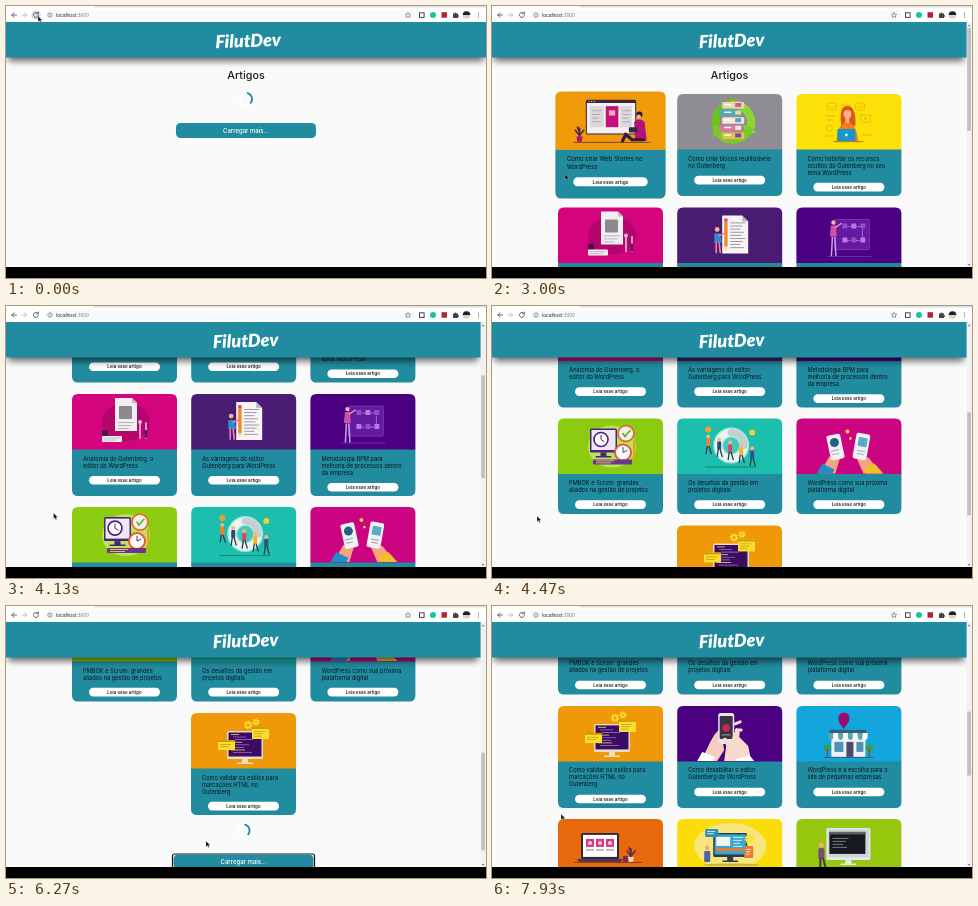
Animation, 480 px wide and 272 px high, one loop 8 s. Source, as an HTML page:

```html
<!DOCTYPE html>
<html lang="pt">
<head>
<meta charset="utf-8">
<title>Artigos</title>
<style>
html, body { margin: 0; width: 100%; height: 100%; overflow: hidden; background: #fafafa; }
svg { display: block; width: 480px; height: 272px; }
text { font-family: Inter, "Open Sans", sans-serif; }
.title { font-size: 5.7px; fill: #08161b; }
.read { font-size: 4.5px; font-weight: 600; fill: #222; text-anchor: middle; }
.url { font: 5px Roboto, sans-serif; fill: #333; }
.mid { text-anchor: middle; }
</style>
</head>
<body>
<svg id="stage" viewBox="0 0 480 272"></svg>
<script>
const LOOP = 8000, LOADED = 1130, CLICK = 5900, MORE = 7130;
const TEAL = '#218c9f', ROWS = [88, 201.5, 314.5, 421.5, 534.5];

// Shape helpers
const R = (x, y, w, h, fill, rx = 0, more = '') =>
  `<rect x="${x}" y="${y}" width="${w}" height="${h}" fill="${fill}" rx="${rx}" ${more}/>`;
const C = (x, y, r, fill, more = '') => `<circle cx="${x}" cy="${y}" r="${r}" fill="${fill}" ${more}/>`;
const E = (x, y, rx, ry, fill) => `<ellipse cx="${x}" cy="${y}" rx="${rx}" ry="${ry}" fill="${fill}"/>`;
const P = (d, fill) => `<path d="${d}" fill="${fill}"/>`;
const L = (d, color, w = 1, more = '') =>
  `<path d="${d}" fill="none" stroke="${color}" stroke-width="${w}" stroke-linecap="round" ${more}/>`;
const many = (n, f) => Array.from({ length: n }, (_, i) => f(i)).join('');
const lines = (n, x, y, w, gap, color, h = .8) =>
  many(n, i => R(x, y + i * gap, w * (1 - (i * 7 % 5) / 12), h, color));
const plant = (x, y, leaf, pot) =>
  L(`M${x} ${y - 4}v-9M${x} ${y - 6}l-4 -5M${x} ${y - 6}l4 -5M${x} ${y - 9}l-2 -5`, leaf, 1.6) +
  P(`M${x - 3} ${y - 5}h6l-1 5h-4z`, pot);
const monitor = (x, y, w, h, frame, screen) =>
  R(x, y, w, h, frame, 1.5) + R(x + 1.5, y + 1.5, w - 3, h - 4, screen) +
  R(x + w / 2 - 3, y + h, 6, 4, frame) + R(x + w / 2 - 8, y + h + 3.5, 16, 1.5, frame, .7);

const webStories = () =>
  plant(23, 48, '#4a2a45', '#b3106f') + L('M18 48.5H90', '#4b2744', .7) +
  R(29, 8, 48, 33, '#43263f', 1.5) + R(30, 11, 46, 29, '#f3eff0') +
  many(3, i => C(32 + i * 2.5, 9.5, .6, '#f4c44d')) +
  R(33, 14, 13, 20, '#ddd6da') + R(48, 14, 12, 20, '#c4107a') + R(62, 14, 11, 20, '#ddd6da') +
  R(51, 18, 6, 5, '#f0a9c2') + lines(4, 35, 18, 9, 3.5, '#aaa0a8') + lines(4, 64, 18, 8, 3.5, '#aaa0a8') +
  C(80, 22, 3, '#3a1730') + C(79.5, 24, 2, '#f1b097') +
  P('M75 29q5 -5 10 0l2 18h-11z', '#b3127a') + L('M84 46L73 46L67 41L64 47', '#31194a', 3) +
  R(70, 34, 8, 5, '#37283b', .6);

const ARROWS = ['#6cc21c', '#8ed62f', '#79cb25'];
const blocks = () =>
  many(3, i => `<g transform="rotate(${i * 120} 56 28)">` +
    L('M41 37A18 18 0 0 1 54 10', ARROWS[i], 8, 'stroke-linecap="butt"') + P('M53 3l10 7l-10 8z', ARROWS[i]) + '</g>') +
  many(5, i => R(45 - i % 2 * 3, 8 + i * 7.6, 22, 6.6, ['#f0d3b7', '#53a9bd', '#f6e7da', '#d77aa0', '#e8bd57'][i], 1) +
    R(47, 10 + i * 7.6, 7, 1.4, '#fff') + R(58, 9 + i * 7.6, 6, 4, ['#cc5d8b', '#f3d887', '#5c9fc0', '#f1efe9', '#7a4d9b'][i]));

const resources = () =>
  many(3, i => R(31 + i * 14, 9 + i % 2 * 2, 9, 7, 'none', 1, 'stroke="#eda80c" stroke-width=".7"') +
    L(`M${33 + i * 14} 13h5`, '#eda80c', .7)) +
  R(64, 21, 10, 7, 'none', .6, 'stroke="#eda80c" stroke-width=".7"') + P('M68 22.8v3.4l3 -1.7z', '#eda80c') +
  L('M30 22h8M31 26h6M28 42h8M67 41h9', '#eda80c', .8) + C(33, 34, 3, 'none', 'stroke="#eda80c" stroke-width=".7"') +
  P('M45 32q-3 -20 6 -20t8 20z', '#d9571a') + C(51, 20, 4, '#f8b08a') +
  P('M40 48q1 -19 11 -20q9 1 11 20z', '#f47b20') + R(49, 23, 4, 6, '#f8b08a') +
  R(41, 35, 18, 12, '#1697c9', 1) + C(50, 41, 1.4, '#d7f1f8') + R(37, 47, 30, 1.2, '#c9790e');

const anatomy = () =>
  E(54, 28, 24, 19, '#b3056c') + P('M43 4h17l5 5v28h-22z', '#f3eff1') + P('M60 4v5h5z', '#c5b8c0') +
  R(47, 12, 13, 13, '#8d8790', 1) + lines(3, 46, 28, 16, 3, '#a9a3aa') +
  L('M68 29v15M74 29v15', '#e2c4d6', 1.6) + C(68, 28, 2, '#e2c4d6') + R(72.8, 36, 2.4, 8, '#5f1548', 1) +
  R(30, 36, 6, 6, '#4a1240', 1) + R(30, 42, 20, 6, '#f4eef2', 1) + lines(2, 32, 43.5, 16, 2, '#b9aeb6');

const editor = () =>
  P('M45 8h20l6 6v32h-26z', '#f6f4f5') + P('M65 8v6h6z', '#bdb5c3') +
  lines(9, 53, 15, 15, 3.1, '#8b8393') + R(47, 14, 3.4, 25, '#ef8b26') + P('M47 39h3.4l-1.7 5z', '#f5d1a3') +
  R(47, 11, 3.4, 3, '#db437f') + C(40, 22, 2.4, '#f4ae92') + P('M37 26h6l2 9h-8z', '#3187ca') +
  L('M39 35v10M42 35l1 10M42 28l5 -2', '#e87ea5', 1.7);

const process = () =>
  R(38, 12, 35, 30, '#6419a0', 1, 'stroke="#8a45c4" stroke-width=".7"') +
  many(6, i => R(46 + i % 3 * 9, 16 + (i / 3 | 0) * 14, 5, 5, i % 2 ? '#b67ae0' : '#8f4fca', .5)) +
  L('M52 19h3M61 19h3M66 22v8M60 33h3M51 33h3', '#c79aea', .6) +
  C(37, 15, 2.2, '#f6b2a0') + P('M34.500 18h5l1 11h-7z', '#d24fa8') +
  L('M36 30l-1 18M38.500 30l1 18', '#c9a3e6', 1.5) + L('M39 20l6 -4', '#f6b2a0', 1.2) + R(31, 48.5, 44, .8, '#7a35b5');

const scrum = () =>
  E(54, 28, 24, 21, '#b8e35a') + monitor(32, 10, 27, 24, '#4c2376', '#eee7f6') +
  C(43, 21, 7, '#fff', 'stroke="#4c2376" stroke-width="1.6"') + L('M43 17v4l3 2', '#4c2376') +
  C(68, 15, 8, '#f2f0e8', 'stroke="#de742b" stroke-width="1.8"') + L('M65 15l2 3l5 -6', '#57a832', 1.5) +
  C(65, 34, 8, '#fff', 'stroke="#e65b39" stroke-width="2"') + L('M65 29v5l4 -2', '#513070') +
  R(35, 41, 39, 5, '#6b368d', 1) + lines(2, 38, 42, 18, 2, '#f5d763') + L('M76 23v17', '#ed9c25', 2);

const challenges = () =>
  C(54, 27, 18, '#9fe7dc') + C(54, 27, 13, 'none', 'stroke="#eef3ee" stroke-width="7"') +
  L('M54 14a13 13 0 0 1 13 13', '#c4cfd1', 7) + C(54, 27, 8, '#3ec9ba') +
  many(5, i => { const x = 31 + i * 11, y = 18 + i * 17 % 14;
    return C(x, y, 2, '#f4b48c') + R(x - 2, y + 2, 4, 8, ['#ef8227', '#274e7a', '#d94665', '#f2b625', '#31508b'][i], 1) +
      L(`M${x - 1} ${y + 10}l-1 7M${x + 1} ${y + 10}l2 7`, '#253851', 1.3); }) +
  C(31, 11, 3, '#ef9f2b') + C(75, 14, 3, '#f0d035') + R(28, 48, 51, 1, '#118174');

const phones = () =>
  P('M23 55l10 -17h11l-5 17z', '#f5a47f') + P('M20 55l6 -10l12 6l-2 4z', '#208dc7') +
  R(32, 16, 14, 25, '#eef0f4', 2, 'transform="rotate(-12 39 28)"') + C(38, 24, 4.5, '#28617f') +
  L('M35 33l7 -2M36 36l6 -1', '#9db2bf', 1.2) +
  P('M60 39h12l13 16h-18z', '#f5a47f') + P('M67 50l11 -5l9 10h-17z', '#f3bd29') +
  R(58, 15, 14, 26, '#f1f0f3', 2, 'transform="rotate(10 65 28)"') + R(61, 19, 9, 9, '#5baac9', 1, 'transform="rotate(10 65 28)"') +
  L('M61 32l7 1M61 35l6 1', '#a8abb8', 1.2) + C(51, 13, 2, '#f4c83a') + C(54, 20, 1.4, '#f4c83a');

const gear = (x, y, r) => C(x, y, r, 'none', 'stroke="#f8e12d" stroke-width="1.6"') +
  C(x, y, r + 1.3, 'none', 'stroke="#f8e12d" stroke-width="1.2" stroke-dasharray="1.4 1.4"');
const markup = () =>
  monitor(36, 18, 36, 28, '#e9dcc9', '#3a0d63') +
  many(8, i => R(40 + i % 3 * 2, 21 + i * 2.6, 8 + i * 5 % 12, .8, ['#f2d44d', '#a55fc0', '#8b7fd8'][i % 3])) +
  R(61, 14, 17, 12, '#f7df2c', .7) + R(61, 14, 17, 2, '#cf9b0c') + lines(3, 63, 18, 11, 2.4, '#c89b12') +
  R(27, 27, 17, 10, '#f7df2c', .7) + R(27, 27, 17, 2, '#cf9b0c') + lines(2, 29, 31, 11, 2.4, '#c89b12') +
  gear(57, 12, 2.4) + gear(65, 9, 1.8);

const hands = () =>
  P('M24 55l9 -19q4 -8 10 -14l4 22l-7 11z', '#f3cdbd') + P('M20 55l5 -9l13 5l-2 4z', '#fff') +
  R(41, 7, 16, 31, '#e9e4ea', 2.5) + R(42.5, 10, 13, 23, '#3a3342', 1) + C(49, 22, 3.8, '#c82658') +
  L('M45 29h8', '#a79fae') + C(49, 35.5, 1, '#888') +
  P('M47 55l2 -15l-3 -8q4 -1 7 5l6 -15q5 1 3 9l9 9l3 15z', '#f7dacb') + P('M59 53l13 -4l5 6h-18z', '#fff') +
  L('M58 18l5 -2M59 24l5 0', '#f7dacb', 3);

const shop = () =>
  R(35, 29, 34, 22, '#eef0f2') + R(33, 24, 37, 4, '#35607f') +
  many(8, i => P(`M${32 + i * 4.9} 27h4.9v5q-2.45 4 -4.9 0z`, i % 2 ? '#fff' : '#5aa9a6')) +
  R(38, 36, 9, 10, '#4c93b5') + R(50, 36, 7, 15, '#4b4a6b') + R(60, 36, 7, 10, '#4c93b5') +
  P('M47 23q-6 -8 -5 -11a5.5 5.5 0 0 1 11 0q1 3 -6 11z', '#9a0c72') +
  C(31, 42, 3.6, '#3f9a5a') + R(30.4, 43, 1.2, 8, '#71502c') + C(73, 42, 3.8, '#3f9a5a') + R(72.4, 43, 1.2, 8, '#71502c') +
  R(27, 51, 50, 1, '#246578');

const laptop = () =>
  R(23, 14, 38, 26, '#33233b', 1.5) + R(25, 16, 34, 22, '#fff') +
  many(3, i => R(28 + i * 10, 20, 8, 8, '#d63c86') + C(32 + i * 10, 24, 2, '#f7c8d5') + R(28 + i * 10, 30, 8, 2, '#c0b8c3')) +
  P('M19 40h46l-2 3h-42z', '#4b3a52') + plant(73, 43, '#5b2a4b', '#f2d8bd') +
  R(65, 37, 5, 6, '#7b2a5c', .8) + R(16, 43, 68, .9, '#8d350c');

const support = () =>
  E(53, 27, 36, 23, '#f8e67c') + monitor(36, 14, 34, 24, '#2d3955', '#35a9cf') +
  R(39, 18, 14, 9, '#f3f4ee') + lines(4, 56, 18, 10, 3, '#fff') + R(39, 29, 27, 3, '#e77b32') +
  R(28, 10, 13, 8, '#2f8fb5', 1) + lines(2, 30, 12, 8, 2.5, '#fff') +
  gear(72, 20, 3) + R(67, 27, 9, 12, '#e77b32', 1) + lines(3, 69, 30, 5, 2.5, '#fff') +
  C(30, 29, 2.4, '#f2a67e') + R(27, 32, 6, 11, '#4c61a2', 1) + E(54, 46, 28, 1.5, '#d3b628');

const terminal = () =>
  monitor(30, 9, 44, 32, '#e4e8ea', '#cfd6d9') + R(33, 13, 36, 22, '#17191e') + R(33, 13, 36, 2.5, '#5b6168') +
  lines(4, 36, 19, 16, 3, '#8d9a8a') +
  C(25, 26, 2.5, '#f3ac87') + R(22, 29, 6, 11, '#7b4a76', 1.5) + L('M24 40v8M27 40l2 8', '#433052', 2) +
  R(18, 48, 68, .8, '#5c870d');

const cards = [
  ['#f09a0a', webStories, 'Como criar Web Stories no|WordPress'],
  ['#8f8d93', blocks, 'Como criar blocos reutilizáveis|no Gutenberg'],
  ['#fbe108', resources, 'Como habilitar os recursos|ocultos do Gutenberg no seu|tema WordPress'],
  ['#d4047f', anatomy, 'Anatomia do Gutenberg, o|editor do WordPress'],
  ['#4a1b73', editor, 'As vantagens do editor|Gutenberg para WordPress'],
  ['#4b0082', process, 'Metodologia BPM para|melhoria de processos dentro|da empresa.'],
  ['#8ccc10', scrum, 'PMBOK e Scrum: grandes|aliados na gestão de projetos'],
  ['#1cbfae', challenges, 'Os desafios da gestão em|projetos digitais'],
  ['#cb0582', phones, 'WordPress como sua próxima|plataforma digital'],
  ['#ef9808', markup, 'Como validar os estilos para|marcações HTML no|Gutenberg'],
  ['#4b0082', hands, 'Como desabilitar o editor|Gutenberg do WordPress'],
  ['#12a6dc', shop, 'WordPress é a escolha para o|site de pequenas empresas'],
  ['#e8690b', laptop, ''],
  ['#fbdc0a', support, ''],
  ['#95c80f', terminal, '']
];

function card([color, art, title], i) {
  const rows = title.split('|'), h = (i / 3 | 0) === 2 ? 95.5 : 102, by = 67 + rows.length * 7;
  return `<g id="card${i}">` + P(`M0 55H105V${h - 6}q0 6 -6 6H6q-6 0 -6 -6z`, TEAL) +
    P('M0 55.5V6q0 -6 6 -6H99q6 0 6 6V55.5z', color) + art() +
    rows.map((s, k) => `<text class="title" x="11" y="${66.6 + k * 7}">${s}</text>`).join('') +
    R(17, by + .8, 71, 8.6, '#fff', 4.3) + `<text class="read" x="52.5" y="${by + 6.7}">Leia esse artigo</text></g>`;
}

const toolbar = R(0, 0, 480, 16, '#fff') + R(88, 0, 392, 1.4, '#d9dce1') +
  C(30, 9, 4.8, '#dcdee1', 'id="reloadBg"') +
  L('M10.5 9H5.8M8 6.8L5.8 9L8 11.2', '#555', .9) + L('M16 9h4.7M18.5 6.8l2.2 2.2l-2.2 2.2', '#bbb', .9) +
  L('M32 7.5a2.5 2.5 0 1 0 .4 2M32.4 6v1.8h-1.8', '#555', .9) +
  R(38, 4, 371, 10, '#f8f9f9', 5) + C(44, 9, 2.2, 'none', 'stroke="#666" stroke-width=".6"') + L('M44 8.9v1.2M44 7.7v.1', '#666', .6) +
  '<text class="url" x="50" y="10.8">localhost<tspan fill="#888">:3000</tspan></text>' +
  `<path d="M402 6.3l.8 1.9 2 .1-1.6 1.3.6 2-1.8-1.2-1.8 1.2.6-2-1.6-1.3 2-.1z" fill="none" stroke="#666" stroke-width=".6"/>` +
  R(413.5, 6.8, 4.6, 4.6, 'none', 0, 'stroke="#444" stroke-width="1"') +
  C(427, 9, 3, '#16c79a') + R(435.5, 6.2, 5.5, 5.5, '#b3243b') +
  P('M447 7.5h1.5a1 1 0 0 1 2 0h1.5v1.5a1 1 0 0 1 0 2v1h-5z', '#444') +
  C(460.5, 9, 3.8, '#d8d2c6') + P('M456.7 9a3.8 3.8 0 0 1 7.600 0z', '#222') +
  many(3, i => C(472.5, 7 + i * 2, .6, '#555'));

const stage = document.getElementById('stage');
stage.innerHTML = `
<defs><clipPath id="view">${R(0, 16, 480, 246, '#fff')}</clipPath>
<filter id="soft" x="-10%" y="-200%" width="120%" height="500%"><feGaussianBlur stdDeviation="3.6"/></filter></defs>
${R(0, 0, 480, 272, '#fafafa')}
<g clip-path="url(#view)">
  <g id="page">
    <text id="heading" class="mid" y="73" font-size="10.8" font-weight="500" fill="#1c1c1c">Artigos</text>
    ${cards.map(card).join('')}
    <g id="spinner">${C(0, 0, 6, 'none', 'stroke="#fff" stroke-width="2"')}${L('M1.6 -5.8A6 6 0 0 1 4.6 3.9', TEAL, 1.8)}</g>
    <g id="more">
      ${R(-71, -.5, 142, 16, '#fff', 2, 'id="focus" stroke="#111" stroke-width="1.2"')}
      ${R(-70, 0, 140, 15, TEAL, 4.5)}
      <text class="mid" y="9.7" font-size="6" font-weight="500" fill="#fff">Carregar mais...</text>
    </g>
  </g>
  ${R(2, 42, 474, 13, '#000', 0, 'id="shadow" filter="url(#soft)" opacity=".6"')}
  ${R(0, 16, 480, 35.5, TEAL)}
  <g id="logo"><text class="mid" y="41" font-size="18" font-weight="900" font-style="italic" fill="#fff" transform="rotate(-2 0 36)" style="font-family:Lato,sans-serif">FilutDev</text></g>
  <g id="bar">${R(474.6, 16, 5.4, 246, '#f1f1f1')}${P('M475.7 20.3l1.4 -1.8l1.4 1.8zM475.7 258l1.4 1.8l1.4 -1.8z', '#777')}
  ${R(475.2, 22, 3.8, 100, '#c1c1c1', 0, 'id="thumb"')}</g>
</g>
${toolbar}
${R(0, 261, 480, 11, '#000')}
<path id="cursor" d="M0 0v5.8l1.4 -1.2l.9 2l1 -.4l-.9 -2h1.8z" fill="#111" stroke="#fff" stroke-width=".25"/>`;

const $ = id => document.getElementById(id);
const move = (id, x, y, extra = '') => $(id).setAttribute('transform', `translate(${x} ${y}) ${extra}`);
const show = (id, on) => $(id).setAttribute('visibility', on ? 'visible' : 'hidden');
const smooth = u => { u = Math.max(0, Math.min(1, u)); return u * u * (3 - 2 * u); };

// Eased value between [time, ...values] keys
function at(keys, t, k = 1) {
  let i = 0;
  while (i < keys.length - 2 && t >= keys[i + 1][0]) i++;
  const a = keys[i], b = keys[i + 1];
  return a[k] + (b[k] - a[k]) * smooth((t - a[0]) / (b[0] - a[0]));
}

const scrollKeys = [[3520, 0], [3780, 67], [3930, 67], [4440, 202], [4600, 202], [5280, 314.5], [7790, 314.5], [8000, 324]];
const cursorKeys = [[0, 32, 10], [800, 33, 10], [1400, 45.5, 64], [1650, 45.5, 64], [1950, 30, 84], [2300, 74, 165],
  [3000, 73, 168], [3200, 73, 168], [3470, 57, 200], [3800, 51, 203], [4400, 45, 210], [5230, 45, 210],
  [5750, 200, 228], [6150, 200, 235], [7050, 200, 235], [7650, 80, 212], [7930, 69, 208], [8000, 69, 208]];

function draw(t) {
  const loaded = t >= LOADED, more = t >= MORE;
  const busy = !loaded || (t >= CLICK && !more);
  const mid = loaded ? 237.5 : 240, scroll = at(scrollKeys, t);
  const end = !loaded ? 77 : more ? 862 : 523;
  const btn = end + (busy ? 40 : 10);
  move('page', 0, -scroll);
  $('heading').setAttribute('x', mid);

  const grow = 1 + .05 * (smooth((t - 2080) / 200) - smooth((t - 3270) / 200));
  cards.forEach((_, i) => {
    show('card' + i, more || (loaded && i < 10));
    const x = i === 9 && !more ? 185 : 66 + i % 3 * 119.2;
    move('card' + i, x, ROWS[i / 3 | 0], i ? '' : `translate(52.5 51) scale(${grow}) translate(-52.5 -51)`);
  });

  show('spinner', busy);
  move('spinner', mid, end + 16, `rotate(${(loaded ? t - 6270 : t) * .36})`);
  move('more', mid, btn);
  show('focus', t >= CLICK);

  move('logo', loaded ? 239.5 : 242, 0);
  $('shadow').setAttribute('width', loaded ? 470 : 476);
  const height = more ? 900 : busy ? 590 : 560, thumb = 234 * 246 / height;
  show('bar', loaded);
  $('thumb').setAttribute('y', 22 + scroll / (height - 246) * (234 - thumb));
  $('thumb').setAttribute('height', thumb);

  show('reloadBg', t < 950);
  move('cursor', at(cursorKeys, t), at(cursorKeys, t, 2));
}

const start = performance.now();
function tick() {
  draw((performance.now() - start) % LOOP);
  requestAnimationFrame(tick);
}
draw(0);
requestAnimationFrame(tick);
</script>
</body>
</html>
```
